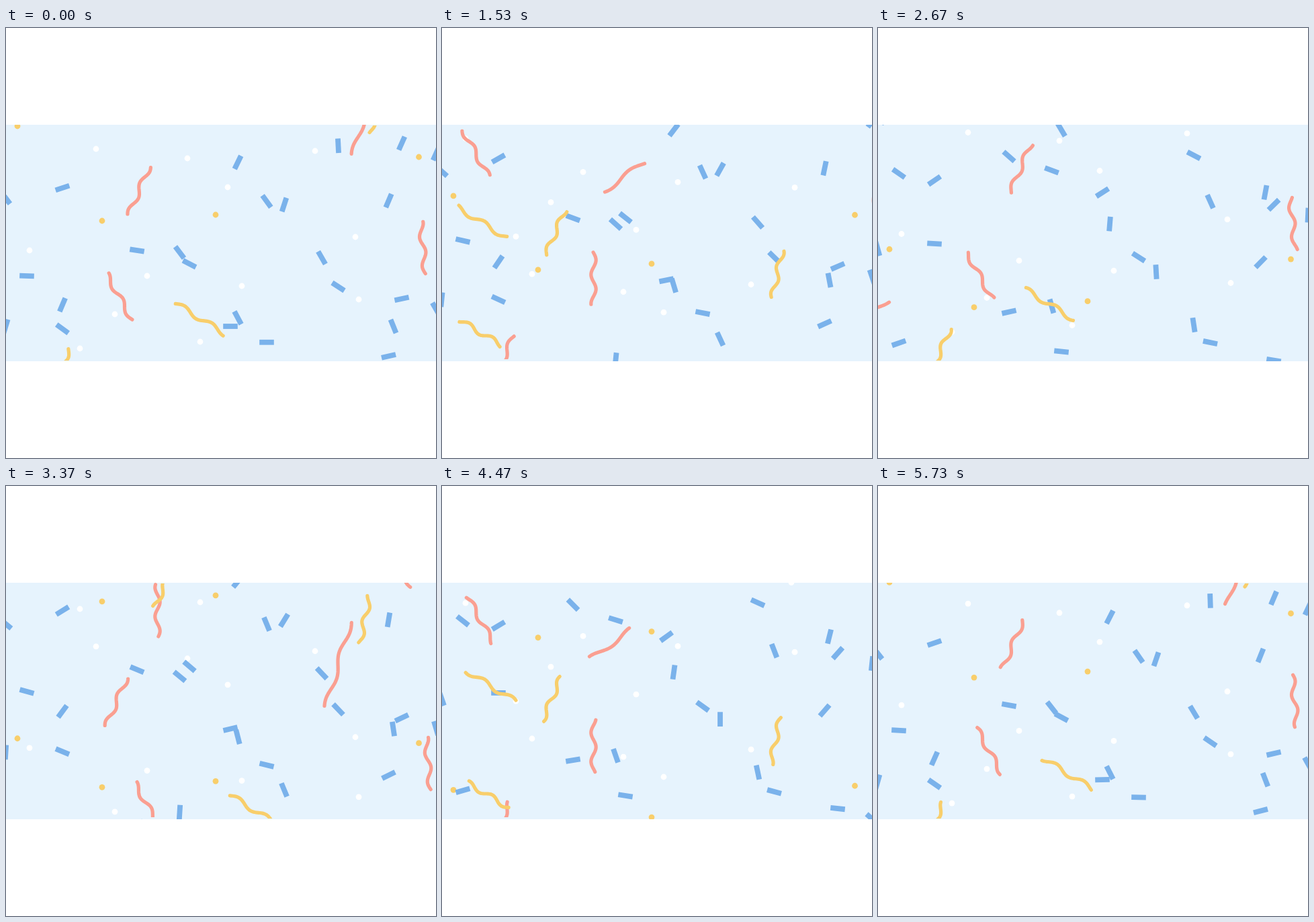
Animation, 640 px wide and 640 px high, one loop 5.76 s. Source, as an HTML page with a canvas:

```html
<!DOCTYPE html>
<html lang="en">
<head>
<meta charset="utf-8">
<title>Confetti</title>
<style>
  html, body { margin: 0; height: 100%; overflow: hidden; background: #fff; }
  canvas { display: block; width: 100vw; height: 100vh; }
</style>
</head>
<body>
<canvas width="640" height="640"></canvas>
<script>
const ctx = document.querySelector('canvas').getContext('2d');
const SKY = '#e6f3fd', BLUE = '#7ab2eb', SALMON = '#fa9f91', YELLOW = '#f8ce6b';
const LOOP = 5760, TOP = 144, BOTTOM = 496, TURN = 2 * Math.PI, DEGREE = Math.PI / 180;
const SPIN = 54 / 48;   // degrees a bar turns per frame
const RIPPLE = 3.7;     // height of a streamer's waves
let frame = 0;

// Copies of a part follow each other, one per period; t is the age of a copy
function repeat(period, x, y, speed, draw) {
  for (let k = -2; k <= 2; k++) {
    const t = frame % period + k * period;
    ctx.save();
    ctx.translate(x, y + speed * t);
    draw(t);
    ctx.restore();
  }
}

function dots(color, period, speed, ...places) {
  ctx.fillStyle = color;
  for (const [x, y] of places) repeat(period, x, y, speed, () => {
    ctx.beginPath();
    ctx.arc(0, 0, 4.4, 0, TURN);
    ctx.fill();
  });
}

// The sign of the angle is also the direction of the spin
function bars(speed, ...places) {
  ctx.fillStyle = BLUE;
  for (const [x, y, angle] of places) repeat(48, x, y, speed, t => {
    ctx.rotate((angle + Math.sign(angle) * SPIN * t) * DEGREE);
    ctx.fillRect(-10.8, -3.9, 21.6, 7.8);
  });
}

// A streamer slides along a sine path, a wave in six frames.
// Its tail passes x, y at the given time, in the given heading.
function streamer(color, wave, x, y, heading, time, waves = 1.79) {
  ctx.strokeStyle = color;
  repeat(72, x, y, 0, t => {
    const tail = (t - time) / 6;
    ctx.rotate(heading * DEGREE);
    ctx.beginPath();
    for (let i = 0; i <= 48; i++) {
      const u = tail + waves * i / 48;
      ctx.lineTo(u * wave, -RIPPLE * Math.sin(TURN * u));
    }
    ctx.stroke();
  });
}

function clip(x, y, right, bottom, draw) {
  ctx.save();
  ctx.beginPath();
  ctx.rect(x, y, right - x, bottom - y);
  ctx.clip();
  draw();
  ctx.restore();
}

function confetti() {
  ctx.fillStyle = SKY;
  ctx.fillRect(0, TOP, 640, BOTTOM - TOP);

  dots(YELLOW, 144, 1.92, [143, 287], [312, 278]);
  dots(YELLOW, 144, 2.27, [614.5, 192]);
  dots(YELLOW, 144, 2.735, [17, 146]);
  dots('#fff', 72, 4.55, [210, 369], [351, 384]);
  dots('#fff', 72, 4.9, [35, 331], [110, 477], [134, 180], [162, 426], [289, 467], [330, 237], [525, 404]);
  dots('#fff', 72, 5.23, [270, 194], [460, 183], [520, 311]);

  bars(3.98, [-0.5, 253, 53]);
  bars(4.21, [258.5, 334, 53]);
  bars(4.37, [84, 238, 162], [388, 258, -126], [494.5, 385, -147]);
  bars(4.82, [195, 331, -171], [345, 200, -64], [569.5, 257, 113], [589, 403, 168], [640, 187, -66]);
  bars(5.26, [31, 369, -178], [414, 263, -72], [470, 342, 60]);
  bars(6.38, [84, 412, -67]);
  bars(6.87, [273, 351, -153], [334, 444, 180], [576.5, 444, -112]);
}

function salmonStreamers() {
  streamer(SALMON, 43.2, 225.5, 205, 90, 20.1);
  streamer(SALMON, 43.2, 147.5, 361, 113, 23.3);
  streamer(SALMON, 43.2, 166, 395.6, 61, 4.6);
  streamer(SALMON, 43.2, 616.3, 279.3, 84.8, -1.3);
  streamer(SALMON, 43.2, 634.5, 231, 68, 34.8);
  streamer(SALMON, 72.8, 474, 337, 106, 23.5);
  streamer(SALMON, 72.8, 266, 225, 144.4, 41.5, 1);
}

function yellowStreamers() {
  streamer(YELLOW, 47.7, 173, 360.2, 31.9, 60.2);
  streamer(YELLOW, 39.5, 65, 458, 31, 44.7);
  streamer(YELLOW, 39.5, 171, 299, 113.2, 42.4);
  streamer(YELLOW, 39.5, 531.6, 210.5, 101.8, 19.2);
}

function render() {
  ctx.fillStyle = '#fff';
  ctx.fillRect(0, 0, 640, 640);
  ctx.lineWidth = 5.2;
  ctx.lineCap = ctx.lineJoin = 'round';
  clip(0, TOP, 640, BOTTOM, confetti);
  clip(0, TOP, 640, 493, salmonStreamers);
  clip(2, 145, 640, 495, yellowStreamers);
}

// Five uneven steps in every 200 ms
function frameAt(ms) {
  const rest = ms % 200;
  return 5 * Math.floor(ms / 200) + [30, 70, 130, 170].filter(cut => rest >= cut).length;
}

const begin = performance.now();
function tick() {
  frame = frameAt((performance.now() - begin) % LOOP);
  render();
  requestAnimationFrame(tick);
}
tick();
</script>
</body>
</html>
```
